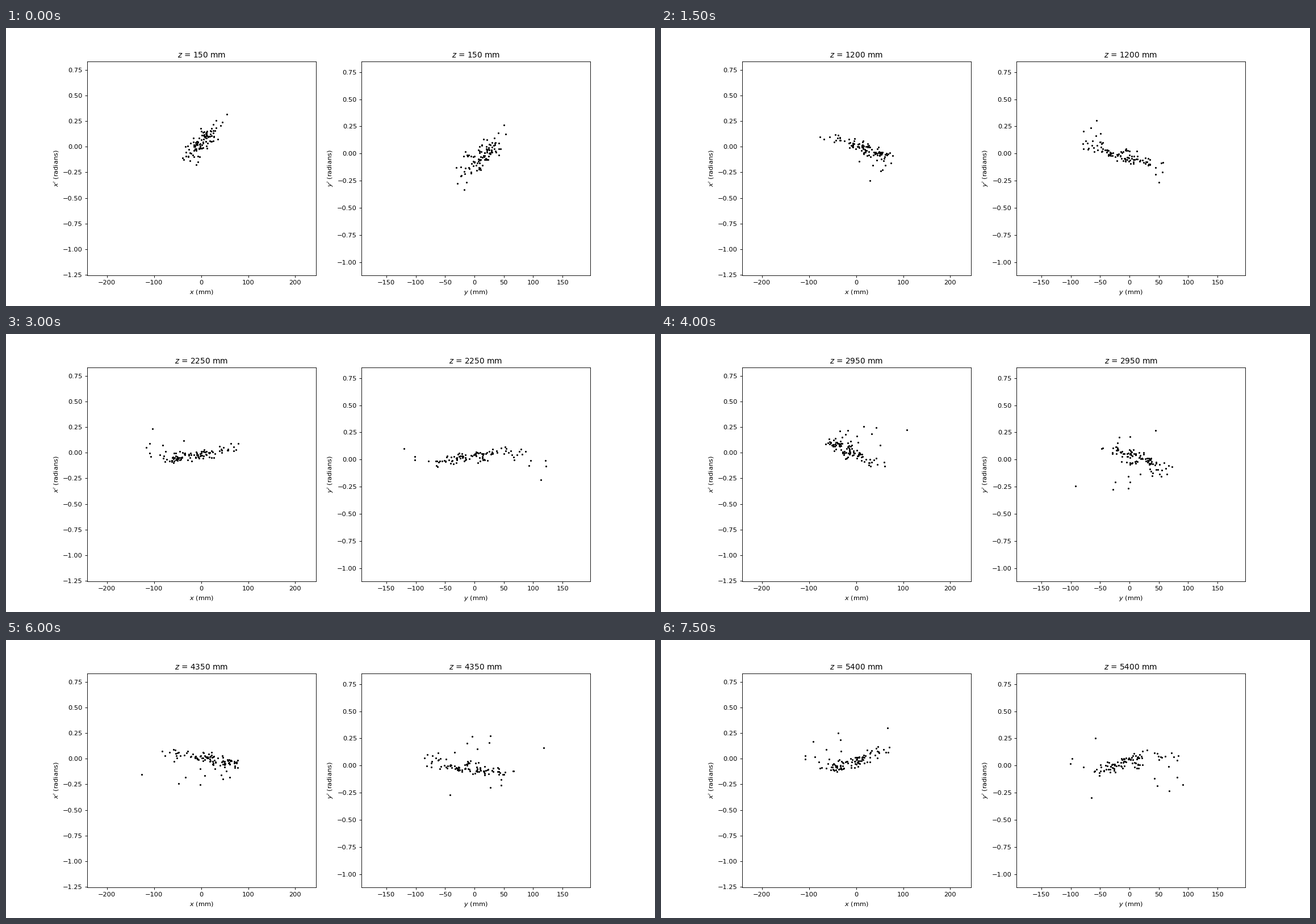
Animation of 1143x490 px, one loop 8 s. Source, as a matplotlib script:

```python
import numpy as np
import matplotlib.pyplot as plt
from matplotlib.animation import FuncAnimation

WIDTH, HEIGHT = 1143, 490
DPI = WIDTH / 14
FRAMES, INTERVAL = 16, 500
Z_START, Z_STEP = 150, 350

COUNT = 104
FOCUS = 1700            # mm between two waists of the beam
K0 = np.pi / FOCUS
RADIUS = 190            # amplitude at which the focusing strength doubles

# name, x limits, y limits, mean swing and mean starting offset in mm
PLANES = (
    ("x", (-242, 243.5), (-1.255, .832), 24, -7),
    ("y", (-192.3, 196.9), (-1.1217, .8486), -8, 16),
)

rng = np.random.default_rng(12)
swing = rng.normal(0, 52, (2, COUNT))
offset = rng.normal(0, 11, (2, COUNT))
for i, plane in enumerate(PLANES):
    swing[i] += plane[3]
    offset[i] += plane[4]

# Wide orbits are focused harder, so the beam slowly smears out.
wavenumber = K0 * (1 + (np.hypot(*swing) / RADIUS) ** 4)


def transport(z):
    """Positions and angles of all particles, each on its own oscillation."""
    phase = wavenumber * z
    c, s = np.cos(phase), np.sin(phase)
    return swing * s + offset * c, wavenumber * (swing * c - offset * s)


# The small margin keeps the pixel size from rounding down.
fig, axes = plt.subplots(
    1, 2, figsize=((WIDTH + .001) / DPI, (HEIGHT + .001) / DPI), dpi=DPI)
dots = []
for ax, (name, xlim, ylim, *_) in zip(axes, PLANES):
    dots += ax.plot([], [], "k.", markersize=3.5)
    ax.set(xlim=xlim, ylim=ylim,
           xlabel=f"${name}$ (mm)", ylabel=f"${name}'$ (radians)")


def update(k):
    z = Z_START + Z_STEP * k
    for ax, dot, pos, ang in zip(axes, dots, *transport(z)):
        dot.set_data(pos, ang)
        ax.set_title(f"$z$ = {z} mm")
    return dots


anim = FuncAnimation(fig, update, frames=FRAMES, interval=INTERVAL,
                     repeat=True, repeat_delay=0, blit=False)
plt.show()
```
